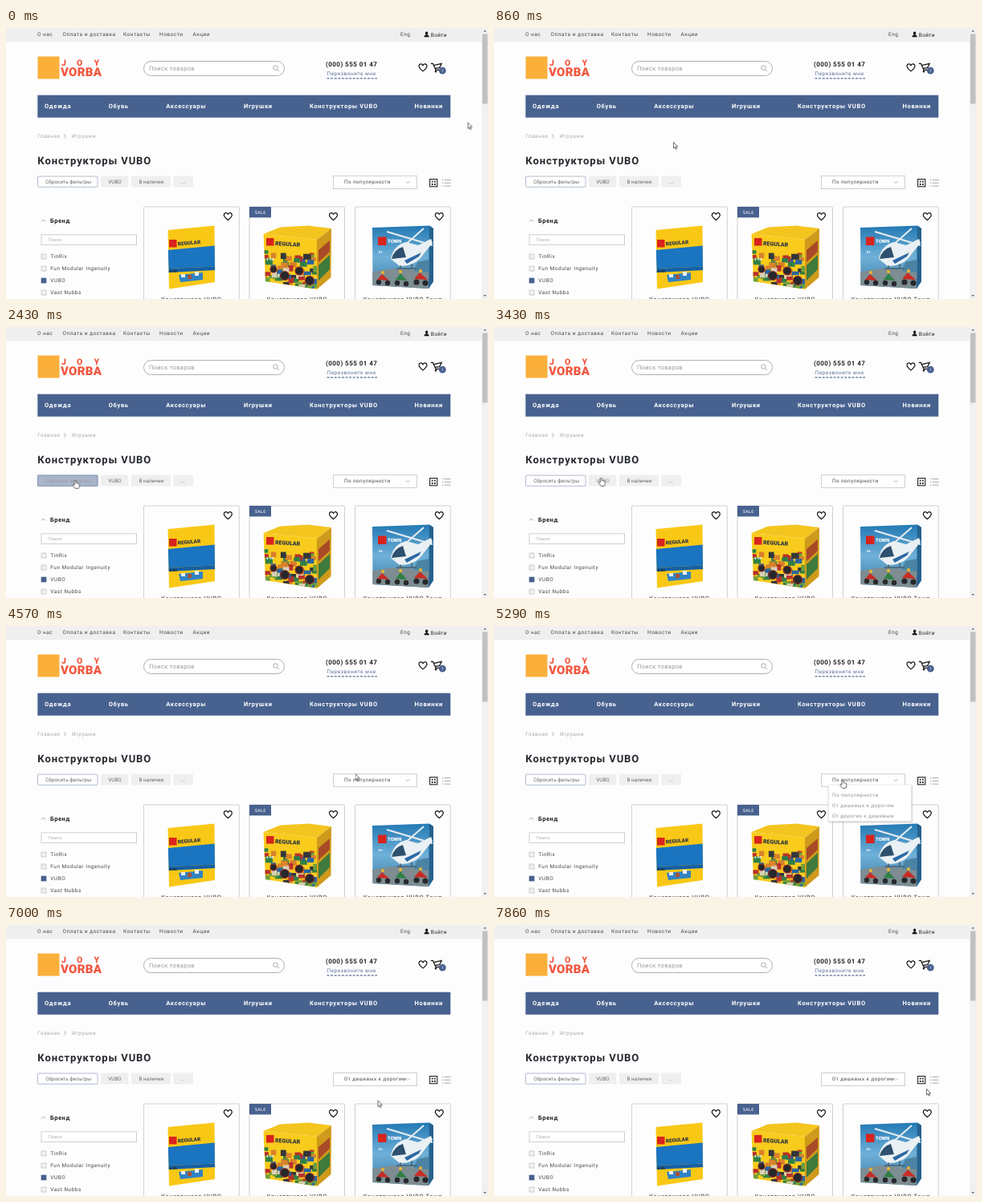
An HTML page for the animation above (8 s loop, 600x338 px).

```html
<!DOCTYPE html>
<html lang="ru">
<head>
<meta charset="utf-8">
<title>Каталог</title>
<style>
html, body { margin: 0; width: 100%; height: 100%; overflow: hidden; background: #fdfdfe; }
svg { display: block; width: 100%; height: 100%; }
text { font: 6.5px Roboto, sans-serif; letter-spacing: .5px; fill: #484848; text-rendering: geometricPrecision; }
.line { fill: none; stroke: #cfcfd3; }
.dim text, text.dim { fill: #aaa; }
.chips text { font-size: 6.3px; letter-spacing: .05px; fill: #666; }
.menu text { font-size: 7.5px; font-weight: 700; letter-spacing: .68px; fill: #fff; }
.sort text { font-size: 6.3px; letter-spacing: .45px; }
.names text { font-size: 7.5px; letter-spacing: .6px; text-anchor: middle; fill: #333; }
.logo text { font-weight: 900; fill: #f2553d; }
.pack text { font-weight: 900; letter-spacing: 0; }

.anim { animation: 8s step-end infinite; }
#cursor { animation-name: move; }
#arrow { animation-name: arrow; }
#hand { animation-name: hand; }
#press { animation-name: press; }
#tag { animation-name: tag; }
#list { animation-name: list; }
#row { animation-name: row; }
#before { animation-name: before; }
#after { animation-name: after; }

@keyframes move {
  0% { transform: translate(574.5px, 117.5px); }
  5.35% { transform: translate(556px, 119px); }
  7.14% { transform: translate(456px, 126px); }
  8.92% { transform: translate(320px, 136px); }
  10.71% { transform: translate(223px, 142px); }
  12.49% { transform: translate(176px, 143px); }
  14.28% { transform: translate(145px, 143px); }
  16.07% { transform: translate(124px, 143px); }
  17.85% { transform: translate(113px, 144px); }
  19.64% { transform: translate(94px, 153px); }
  21.42% { transform: translate(84px, 160px); }
  24.99% { transform: translate(84px, 168px); }
  26.78% { transform: translate(85px, 179px); }
  28.57% { transform: translate(86px, 188px); }
  30.35% { transform: translate(86.5px, 191px); }
  33.92% { transform: translate(103px, 190px); }
  35.71% { transform: translate(124px, 189px); }
  37.49% { transform: translate(133.5px, 188px); }
  44.64% { transform: translate(150px, 188px); }
  46.42% { transform: translate(205px, 187px); }
  48.21% { transform: translate(285px, 186px); }
  49.99% { transform: translate(358px, 185px); }
  51.78% { transform: translate(405px, 184px); }
  53.57% { transform: translate(428px, 184px); }
  55.35% { transform: translate(434.5px, 184px); }
  60.71% { transform: translate(434px, 189px); }
  62.49% { transform: translate(434px, 192px); }
  71.42% { transform: translate(437px, 195px); }
  73.21% { transform: translate(444px, 202px); }
  74.99% { transform: translate(453px, 210px); }
  76.78% { transform: translate(460px, 216px); }
  78.57% { transform: translate(462.5px, 218.5px); }
  89.28% { transform: translate(465px, 219px); }
  91.07% { transform: translate(473px, 220px); }
  92.85% { transform: translate(486px, 221px); }
  94.64% { transform: translate(495px, 221px); }
  96.42% { transform: translate(520px, 213px); }
  98.21%, 100% { transform: translate(538px, 204px); }
}
@keyframes hand {
  0%, 33.92%, 44.64%, 85.71%, 100% { opacity: 0; }
  28.57%, 35.71%, 60.71% { opacity: 1; }
}
@keyframes arrow {
  0%, 33.92%, 44.64%, 85.71%, 100% { opacity: 1; }
  28.57%, 35.71%, 60.71% { opacity: 0; }
}
@keyframes press {
  0%, 37.49%, 100% { opacity: 0; }
  28.57% { opacity: .2; }
  30.35% { opacity: .47; }
  32.14% { opacity: .9; }
  33.92% { opacity: .6; }
  35.71% { opacity: .25; }
}
@keyframes tag {
  0%, 44.64%, 100% { opacity: 1; }
  35.71% { opacity: .7; }
}
@keyframes list {
  0%, 85.71%, 100% { opacity: 0; transform: none; }
  62.49% { opacity: .6; transform: translateY(-3px); }
  64.28% { opacity: 1; transform: none; }
  83.92% { opacity: .4; transform: translateY(-3px); }
}
@keyframes row {
  0% { opacity: 0; transform: translateY(-13px); }
  74.99% { opacity: 1; transform: translateY(-13px); }
  78.57%, 100% { opacity: 1; transform: none; }
}
@keyframes before { 0% { opacity: 1; } 83.92%, 100% { opacity: 0; } }
@keyframes after { 0% { opacity: 0; } 83.92%, 100% { opacity: 1; } }
</style>
</head>
<body>
<svg viewBox="0 0 600 338" preserveAspectRatio="none">
  <defs>
    <path id="heart" d="M0 4.6C-2.2 2.8-5 .8-5-1.7C-5-4.8-1.4-5.4 0-2.7C1.4-5.4 5-4.8 5-1.7C5 .8 2.2 2.8 0 4.6Z" fill="#fff" stroke="#111" stroke-width="1.2"/>
    <linearGradient id="sky" x2="0" y2="1">
      <stop stop-color="#2379b4"/><stop offset=".5" stop-color="#6fb0d8"/><stop offset="1" stop-color="#3a7ba6"/>
    </linearGradient>
    <filter id="soft" x="-10%" y="-20%" width="120%" height="140%"><feGaussianBlur stdDeviation="1"/></filter>
    <clipPath id="face"><path d="M321.5 276L387 281V325.5L323 316Z"/></clipPath>
  </defs>
  <rect width="600" height="338" fill="#fdfdfe"/>

  <!-- top bar -->
  <rect width="592" height="17.5" fill="#efeff0"/>
  <text x="39" y="10.3">О нас</text>
  <text x="70.5" y="10.3">Оплата и доставка</text>
  <text x="146" y="10.3">Контакты</text>
  <text x="191" y="10.3">Новости</text>
  <text x="232.5" y="10.3">Акции</text>
  <text x="491" y="10.3">Eng</text>
  <path d="M520.3 11.3Q520.3 9 523 8.4V7H524.2V8.4Q526.9 9 526.9 11.3Z" fill="#111"/><ellipse cx="523.6" cy="6.5" rx="1.7" ry="2.1" fill="#111"/>
  <text x="528.8" y="11.4" style="letter-spacing:.3px;fill:#222">Войти</text>

  <!-- header -->
  <g class="logo">
    <rect x="39.5" y="35.5" width="27" height="28" fill="#fbb03b"/>
    <text x="69 88 109.5" y="47" style="font-size:10.5px">JOY</text>
    <text x="68" y="60.3" style="font-size:15px;letter-spacing:.3px">VORBA</text>
  </g>
  <rect class="line" x="171.5" y="41.5" width="175" height="18" rx="9" style="stroke:#b0b0b0;fill:#fff"/>
  <text x="178" y="53.3" style="font-size:7.5px;letter-spacing:.33px;fill:#999">Поиск товаров</text>
  <g fill="none" stroke="#999" stroke-width=".8"><circle cx="335.5" cy="49.6" r="2.8"/><path d="M337.5 51.7L340 54"/></g>
  <text x="398" y="48" style="font-size:8px;font-weight:700;letter-spacing:.45px;fill:#222">(000) 555 01 47</text>
  <text x="399.5" y="58.6" style="letter-spacing:.52px;fill:#5c7196">Перезвоните мне</text>
  <path d="M399.5 62.8H462" stroke="#5c7196" stroke-width="1.3" stroke-dasharray="3 1.6"/>
  <use href="#heart" x="519" y="49.3"/>
  <g fill="none" stroke="#111" stroke-width="1.2"><path d="M528.8 44.4H531.4L535 52.4H540M532.4 46.6L542.2 44.4L539.6 49.6L534 50.4"/><circle cx="535" cy="54.2" r=".7"/></g>
  <circle cx="543.3" cy="53.2" r="4.4" fill="#48628f"/>
  <text x="542.1" y="55" style="font-size:5px;letter-spacing:0;fill:#fff">1</text>

  <g class="menu">
    <rect x="39.3" y="83.7" width="514" height="28" fill="#48628f"/>
    <text x="48" y="100.3">Одежда</text>
    <text x="127.7" y="100.3">Обувь</text>
    <text x="199.3" y="100.3">Аксессуары</text>
    <text x="296" y="100.3">Игрушки</text>
    <text x="378" y="100.3">Конструкторы VUBO</text>
    <text x="508.5" y="100.3">Новинки</text>
  </g>

  <g class="dim">
    <text x="39.3" y="137.4">Главная</text>
    <path class="line" d="M72 132.5L74.6 135L72 137.5" style="stroke:#aaa"/>
    <text x="82" y="137.4">Игрушки</text>
  </g>
  <text x="39.3" y="170" style="font-size:13px;font-weight:700;letter-spacing:.88px;fill:#25282e">Конструкторы VUBO</text>

  <!-- filters -->
  <g class="chips">
    <rect x="39.5" y="185" width="74.5" height="13.3" rx="1" fill="#fff" stroke="#afbccb"/>
    <text x="49.2" y="194">Сбросить фильтры</text>
    <g id="press" class="anim">
      <rect x="39" y="184.5" width="75.5" height="14.3" rx="1" fill="#48628f"/>
      <text x="49.2" y="194" style="fill:#fff;opacity:.75">Сбросить фильтры</text>
    </g>
    <g fill="#efeff0">
      <rect x="118" y="184.5" width="34.3" height="14" rx="1"/>
      <rect x="156" y="184.5" width="49" height="14" rx="1"/>
      <rect x="208.5" y="184.5" width="24.5" height="14" rx="1"/>
    </g>
    <text id="tag" class="anim" x="127.2" y="194">VUBO</text>
    <text x="165.5" y="194">В наличии</text>
    <text x="218" y="194">...</text>
  </g>

  <!-- sorting -->
  <g class="sort">
    <rect class="line" x="407.5" y="184.5" width="104" height="16" style="fill:#fff"/>
    <text id="before" class="anim" x="421" y="194.2">По популярности</text>
    <text id="after" class="anim" x="421" y="194.2">От дешевых к дорогим</text>
    <path class="line" d="M497.8 191.3L500.2 193.6L502.6 191.3" style="stroke:#999;stroke-width:.8"/>
  </g>
  <rect x="527.6" y="188.6" width="9.2" height="9.2" fill="#fff" stroke="#222" stroke-width="1.1"/>
  <path d="M529.8 191.6H534.8M529.8 195H534.8" stroke="#222" stroke-width="1.8" stroke-dasharray="1.8 1.4"/>
  <path d="M543 189.5H553.5M543 193.3H553.5M543 197.1H553.5" stroke="#aaa" stroke-width="1" stroke-dasharray="1.6 1.2 7.7 0"/>

  <!-- sidebar -->
  <path class="line" d="M44.2 241.5L46.6 239L49 241.5" style="stroke:#aaa"/>
  <text x="55" y="242.8" style="font-size:7.5px;font-weight:700;letter-spacing:.6px;fill:#222">Бренд</text>
  <rect class="line" x="44" y="257.8" width="118.5" height="12.7" style="fill:#fff"/>
  <text class="dim" x="53" y="266.2" style="font-size:5.5px;letter-spacing:.1px">Поиск</text>
  <g fill="#f1f1f2" stroke="#bbb" stroke-width=".7">
    <rect x="44" y="282" width="6" height="6"/>
    <rect x="44" y="297" width="6" height="6"/>
    <rect x="44" y="312" width="6" height="6" fill="#48628f" stroke="#48628f"/>
    <rect x="44" y="327" width="6" height="6"/>
  </g>
  <text x="55.3" y="287.2">TinRix</text>
  <text x="55.3" y="302.2">Fun Modular Ingenuity</text>
  <text x="55.3" y="317.2">VUBO</text>
  <text x="55.3" y="332.2">Vast Nubbs</text>

  <!-- products -->
  <g class="line">
    <rect x="171.5" y="223" width="118.8" height="130" rx="1"/>
    <rect x="303" y="223" width="118.5" height="130" rx="1"/>
    <rect x="434.5" y="223" width="118.8" height="130" rx="1"/>
  </g>
  <rect x="303" y="223" width="27" height="13.4" fill="#48628f"/>
  <text x="309.7" y="231.6" style="font-size:5.4px;letter-spacing:.3px;fill:#fff">SALE</text>
  <use href="#heart" x="276.3" y="235"/>
  <use href="#heart" x="407.5" y="235"/>
  <use href="#heart" x="539.3" y="235"/>

  <g class="pack">
    <path d="M201.5 252L259.5 246.5L260 317L203 325.5Z" fill="#f9c816"/>
    <path d="M201.8 277L259.7 271.5L260 297.5L202.5 300Z" fill="#1a74c0"/>
    <path d="M202.5 300L260 297.5V302L202.6 305Z" fill="#1560a3"/>
    <path d="M215 308L245 305V314L217 317Z" fill="#2f83c4"/>
    <path d="M218 307H223V311H218ZM235 304H240V309H235Z" fill="#eceff0"/>
    <path d="M226 308H231V313H226Z" fill="#a8503a"/>
    <rect x="203" y="264" width="9.5" height="9.5" fill="#d9231d"/>
    <text x="214" y="271.5" transform="rotate(-5 214 271)" style="font-size:6.4px;fill:#263044">REGULAR</text>
    <text x="203.5" y="304.5" style="font-size:4.2px;fill:#222">4-99</text>
  </g>

  <g class="pack">
    <path d="M320.5 257L341 248.5L376 246.5L405 250L387 264Z" fill="#f4c51f"/>
    <path d="M387 264L405 250L404.5 311L387 326Z" fill="#cf9a1b"/>
    <path d="M320.5 257L387 264V326L323 316Z" fill="#f8cb1c"/>
    <g id="bricks" clip-path="url(#face)"></g>
    <path d="M389 277L403 265V279L389 292Z" fill="#a94a26"/><path d="M389 296L403 283V301L389 315Z" fill="#3d7a3c"/>
    <g fill="#26282c" stroke="#8d2c24" stroke-width="1.2">
      <circle cx="347" cy="309" r="5.5"/><circle cx="365" cy="303" r="5"/><circle cx="378" cy="315" r="5.5"/><circle cx="333" cy="301" r="4"/>
    </g>
    <rect x="324" y="262" width="9.5" height="9.5" fill="#d9231d"/>
    <text x="335" y="271" transform="rotate(3 335 271)" style="font-size:7px;fill:#263044">REGULAR</text>
    <text x="324" y="290" style="font-size:4.2px;fill:#fff">4-99</text>
  </g>

  <g class="pack">
    <path d="M456 249L527 246.5L532 250V316L526 325L456.5 321Z" fill="url(#sky)"/>
    <path d="M527 246.5L532 250V316L526 325Z" fill="#24618f"/>
    <path d="M456.3 304L480 300L526.5 303L526 325L456.5 321Z" fill="#7d8d92"/>
    <path d="M512 292L526.5 289V305L508 303Z" fill="#4a83a3"/>
    <g fill="none" stroke="#e6edf1" stroke-width="2"><path d="M474 254L531 271M486 280L520 250"/></g>
    <path d="M479 288Q482 271 498 267L513 271L529 263L531 268L519 283Q510 297 490 297Z" fill="#eaf0f3"/>
    <path d="M480 288Q483 276 494 273L498 286Z" fill="#2d506e"/>
    <path d="M496 290L517 280L514 285L499 294Z" fill="#2b69a4"/>
    <path d="M486 300H511M491 296V300M505 294V300" fill="none" stroke="#444" stroke-width="1"/>
    <g fill="#26282c"><circle cx="464" cy="317" r="3.2"/><circle cx="475" cy="318" r="3.2"/><circle cx="487" cy="318" r="3.2"/><circle cx="498" cy="319" r="3.2"/><circle cx="511" cy="317" r="3.6"/><circle cx="522" cy="318" r="3.6"/></g>
    <path d="M462 314L468 307L477 315ZM508 313L515 305L525 314Z" fill="#c62c24"/>
    <path d="M485 314L491 306L499 315Z" fill="#2f7f45"/>
    <g fill="#edb62d"><circle cx="469" cy="305" r="2"/><circle cx="491" cy="304" r="2"/><circle cx="516" cy="303" r="2"/></g>
    <rect x="463" y="260.5" width="10.5" height="10.5" fill="#d9231d"/>
    <text x="475" y="268.3" style="font-size:6px;fill:#fff">TOWN</text>
    <text x="464" y="281" style="font-size:4.2px;fill:#fff">5+</text>
  </g>

  <g class="names">
    <text x="230.7" y="340.5">Конструктор VUBO</text>
    <text x="362.3" y="340.5">Конструктор VUBO</text>
    <text x="494" y="340.5">Конструктор VUBO Town</text>
  </g>

  <!-- drop-down -->
  <g id="list" class="sort anim">
    <rect x="416.5" y="199" width="104" height="46" rx="1" fill="#777" opacity=".4" filter="url(#soft)"/>
    <rect x="416.5" y="198" width="103" height="45.5" rx="1" fill="#fff" stroke="#ddd" stroke-width=".6"/>
    <rect id="row" class="anim" x="417" y="217.7" width="102" height="12.6" fill="#f5f6f7"/>
    <g fill-opacity=".6">
      <text x="421" y="213.2">По популярности</text>
      <text x="421" y="226.4">От дешевых к дорогим</text>
      <text x="421" y="239.2">От дорогих к дешевым</text>
    </g>
  </g>

  <!-- scrollbar -->
  <rect x="592" width="8" height="338" fill="#f1f1f1"/>
  <rect x="593" y="7.5" width="6.5" height="87" fill="#c1c1c1"/>
  <path d="M594.3 4.6L596.2 2.6L598.1 4.6ZM594.3 333L596.2 335L598.1 333Z" fill="#666"/>

  <g id="cursor" class="anim" fill="#fff" stroke="#333" stroke-width=".75" stroke-linejoin="round">
    <path id="arrow" class="anim" d="M.4 .4V8L2.1 6.4L3.3 9.1L4.5 8.6L3.4 6H5.7Z"/>
    <path id="hand" class="anim" d="M-1 5.8V1Q-1 .2 0 .2T1 1V3.6Q1.7 3.2 2.3 3.9Q3 3.5 3.5 4.2Q4.8 4 4.8 5.3V7.5Q4.8 9 3.8 10.3H-.4L-3 6.8Q-3.3 5.6-2.2 5.2Z"/>
  </g>
</svg>
<script>
// Loose bricks on the middle box
let seed = 7;
const rand = () => (seed = seed * 16807 % 2147483647) / 2147483647;
const colors = ["#b8322b", "#2f7f46", "#2a659f", "#d9822c", "#34363a", "#d8d0b8", "#6f9f3a"];
const bricks = document.getElementById("bricks");
for (let i = 0; i < 70; i++) {
  const brick = document.createElementNS("http://www.w3.org/2000/svg", "rect");
  const attrs = {
    x: 319 + rand() * 64, y: 277 + rand() * 45,
    width: 5 + rand() * 5, height: 4 + rand() * 4,
    fill: colors[Math.floor(rand() * colors.length)]
  };
  for (const key in attrs) brick.setAttribute(key, attrs[key]);
  bricks.append(brick);
}
</script>
</body>
</html>
```
